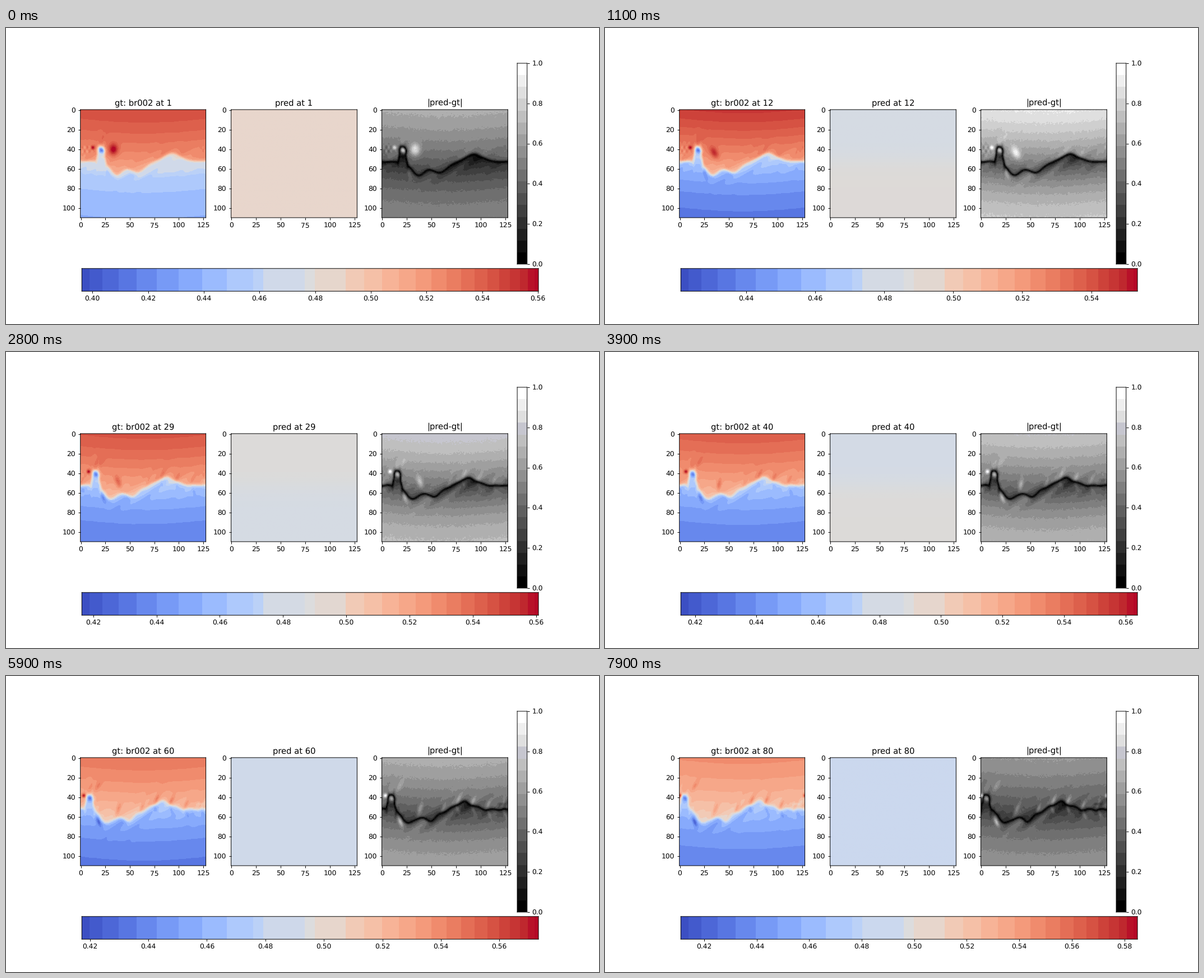
A matplotlib script that plays this animation: 1058x529 px, repeating every 8 s.

```python
import numpy as np
import matplotlib.pyplot as plt
from matplotlib.animation import FuncAnimation
from matplotlib.colors import ListedColormap

plt.rcParams["text.hinting"] = "none"

W, H = 1058, 529
FRAMES, STEP = 80, 100
ROWS, COLS = 110, 128
TAU = 2 * np.pi

rng = np.random.default_rng(4)
X, Y = np.meshgrid(np.arange(COLS, dtype=float), np.arange(ROWS, dtype=float))
GRAIN = rng.normal(0, .0006, (ROWS, COLS))
WAVES = [(TAU / rng.uniform(9, 28), rng.uniform(.1, .9), rng.uniform(0, TAU))
         for _ in range(14)]

# Value range of the colour scale at a few steps
KEYS = [0, 11, 28, 39, 52, 66, 79]
VMIN = [.3962, .4210, .4164, .4154, .4164, .4181, .4111]
VMAX = [.5602, .5534, .5607, .5639, .5695, .5772, .5850]

# Shades of the middle of the colour scale, from cool to warm
RAMP = np.array([(203, 216, 238), (213, 219, 228), (220, 219, 218),
                 (224, 216, 211), (232, 214, 204)]) / 255

# Colour steps of the scale, wider towards the middle
CUTS = np.concatenate([.375 * (np.arange(10) / 9) ** 1.4,
                       [.398, .488, .510],
                       1 - .422 * (np.arange(15, -1, -1) / 15) ** 1.45])
BANDS = plt.get_cmap("coolwarm")((CUTS[:-1] + CUTS[1:]) / 2)[:, :3]
COOL_BAND, WARM_BAND = 10, 12
SCALE = (np.arange(815) + .5) / 815
BAND_OF = np.searchsorted(CUTS, SCALE) - 1


def ramp(n, start, end):
    return np.clip((n - start) / (end - start), 0, 1)


def shade(level):
    return np.stack([np.interp(level, range(5), RAMP[:, c])
                     for c in range(3)], axis=-1)


def warm_cool(n):
    bands = BANDS.copy()
    bands[COOL_BAND] = shade(1 - ramp(n, 45, 66) - .5 * np.exp(-n / 4))
    bands[WARM_BAND] = shade(4 - np.exp(-((n - 20) / 14) ** 2))
    return ListedColormap(bands[BAND_OF])


def grays(tinted):
    levels = np.repeat(np.linspace(0, 1, 17)[:, None], 3, axis=1)
    if tinted:
        levels[13] = .78, .78, .815
    return ListedColormap(levels)


GRAYS = [grays(False), grays(True)]


def bell(x, center, width, power=2):
    return np.exp(-np.abs((x - center) / width) ** power)


def blob(cx, cy, rx, ry, lean=0):
    dx = (X - cx + lean * (Y - cy) + COLS / 2) % COLS - COLS / 2
    return bell(dx, 0, rx) * bell(Y, cy, ry)


def front(n):
    """Height of the interface: head, two valleys, one crest, ripples."""
    p = n / (FRAMES - 1)
    x, drift = X[0], 12 * p ** .7
    line = (52.5 - 16 * bell(x, 20.5 - .2 * n, 4, 4)
            + 14 * bell(x, 36.3 - drift, 9)
            + 11.5 * bell(x, 57.3 - drift, 11)
            - 8 * bell(x, 93 - drift, 12))
    return line + p * np.cos(TAU * (x - 59 + drift) / 13.75)


def streaks(first, gap_x, cy, lean, line, n):
    """Slanted streaks at even distances, following the interface."""
    out = 0
    for x0 in np.arange(first, COLS + 20, gap_x):
        x = x0 - .2 * n
        y = np.interp(x % COLS, X[0], line) + cy
        out = out + blob(x, y, 1.8, 4.5, lean)
    return out


def field(n):
    p = n / (FRAMES - 1)
    lo, hi = np.interp(n, KEYS, VMIN), np.interp(n, KEYS, VMAX)
    line = front(n)
    gap = Y - line
    bow = Y - 4 * np.sin(np.pi * X / COLS)

    # Two layers with a soft border
    top = .545 - .0003 * bow - 4e-6 * bow ** 2
    low = .427 + .0155 * np.exp((82 - bow) / 34) + .005 * np.exp(-n / 5)
    soft = 1.6 * np.hypot(1, np.gradient(line))
    mix = .5 + .5 * np.tanh(gap / soft)
    u = top * (1 - mix) + low * mix

    tex = sum(np.cos(k * (X + .18 * n + (lean + .5) * Y) + ph)
              for k, lean, ph in WAVES) / np.sqrt(len(WAVES))
    u += (.0022 + .002 * p) * bell(gap, 0, 14) * tex

    u += .018 * p * streaks(74, 15, -5, .4, line, n)
    u -= .014 * p * streaks(88, 16, 5, -.35, line, n)
    u += (.002 + .011 * p) * blob(24 - 9 * p, 29, 2.5, 5, .5)
    u -= (.008 + .026 * p) * blob(27 - 12 * p, 65, 2, 4.5, -.35)
    u -= .015 * p * blob(130 - 12 * p, 47, 4, 1.5)

    # Ripples left of the head, fading out
    u += (.012 * (1 - ramp(n, 0, 45)) * np.sin(1.25 * (X + .16 * n))
          * np.cos(.7 * (Y - 38)) * blob(5 - .15 * n, 40, 7, 5))

    # Large warm swirl, sinking and getting thinner
    sink = ramp(n, 0, 40)
    u += (.018 + .018 * np.exp(-n / 9)) * blob(
        33 + 7 * sink - 4 * ramp(n, 40, 79), 40.5 + 12 * sink,
        4.8 - 2.5 * sink, 6, .4 * p - .5 * np.sin(np.pi * sink))

    # Hot spot that leaves on the left and comes back on the right
    u += (hi - .526) * blob(12.3 - .16 * n, 38.5, 2, 2)
    # Cold core of the head
    u -= (.045 + .027 * np.exp(-n / 4)) * blob(20.8 - .2 * n, 41, 3.4, 3.3, -.2)
    return np.clip(u, lo, hi), lo, hi


def prediction(n):
    mean = np.interp(n, [0, 11, 39, 52, 66], [4, 1.7, 1.5, .85, 0])
    swing = .65 * ramp(n, 0, 11) * (1 - ramp(n, 40, 52))
    tilt = swing * np.cos(TAU * (n - 11) / 28)
    rows = shade(mean + tilt * np.tanh((np.arange(ROWS) - 53) / 12))
    return np.repeat(rows[:, None, :], COLS, axis=1)


fig = plt.figure(figsize=(12, 6), dpi=88.1667, facecolor="white")


def box(x0, y0, x1, y1):
    ax = fig.add_axes([x0 / W, 1 - y1 / H, (x1 - x0) / W, (y1 - y0) / H])
    for spine in ax.spines.values():
        spine.set_snap(False)
    return ax


def panel(x0, x1, data):
    ax = box(x0, 145.9, x1, 339)
    im = ax.imshow(data, aspect="auto", vmin=0, vmax=1)
    ax.set_xticks(range(0, 126, 25))
    ax.set_yticks(range(0, 101, 20))
    return ax, im


def bar(x0, y0, x1, y1, data):
    ax = box(x0, y0, x1, y1)
    im = ax.imshow(data, vmin=0, vmax=1, aspect="auto", origin="lower",
                   extent=(0, 1, 0, 1), interpolation="nearest")
    ax.set_xticks([])
    ax.set_yticks([])
    return ax, im


blank = np.zeros((ROWS, COLS))
gt_ax, gt_im = panel(132.7, 356.6, blank)
pred_ax, pred_im = panel(401.6, 626.4, prediction(0))
diff_ax, diff_im = panel(670.5, 895.3, blank)
diff_ax.set_title("|pred-gt|")

vbar, vbar_im = bar(912.1, 63, 929.7, 421.9,
                    ((np.arange(17) + .5) / 17)[:, None])
vbar.yaxis.tick_right()
vbar.set_yticks(np.arange(6) / 5, [f"{v / 5:.1f}" for v in range(6)])
hbar, hbar_im = bar(135.3, 429.8, 950, 470.4, SCALE[None, :])


def update(n):
    u, lo, hi = field(n)
    cmap = warm_cool(n)
    gt_im.set_data((u - lo) / (hi - lo))
    gt_im.set_cmap(cmap)
    hbar_im.set_cmap(cmap)
    pred_im.set_data(prediction(n))

    pred = .486 + .003 * n / FRAMES
    diff_im.set_data(np.abs(u - pred + GRAIN) / max(hi - pred, pred - lo))
    gray = GRAYS[n >= 28]
    diff_im.set_cmap(gray)
    vbar_im.set_cmap(gray)

    ticks = np.arange(np.ceil(lo / .02), np.floor(hi / .02) + 1) * .02
    hbar.set_xticks((ticks - lo) / (hi - lo), [f"{v:.2f}" for v in ticks])
    gt_ax.set_title(f"gt: br002 at {n + 1}")
    pred_ax.set_title(f"pred at {n + 1}")
    return []


anim = FuncAnimation(fig, update, frames=FRAMES, interval=STEP, repeat=True)
plt.show()
```
